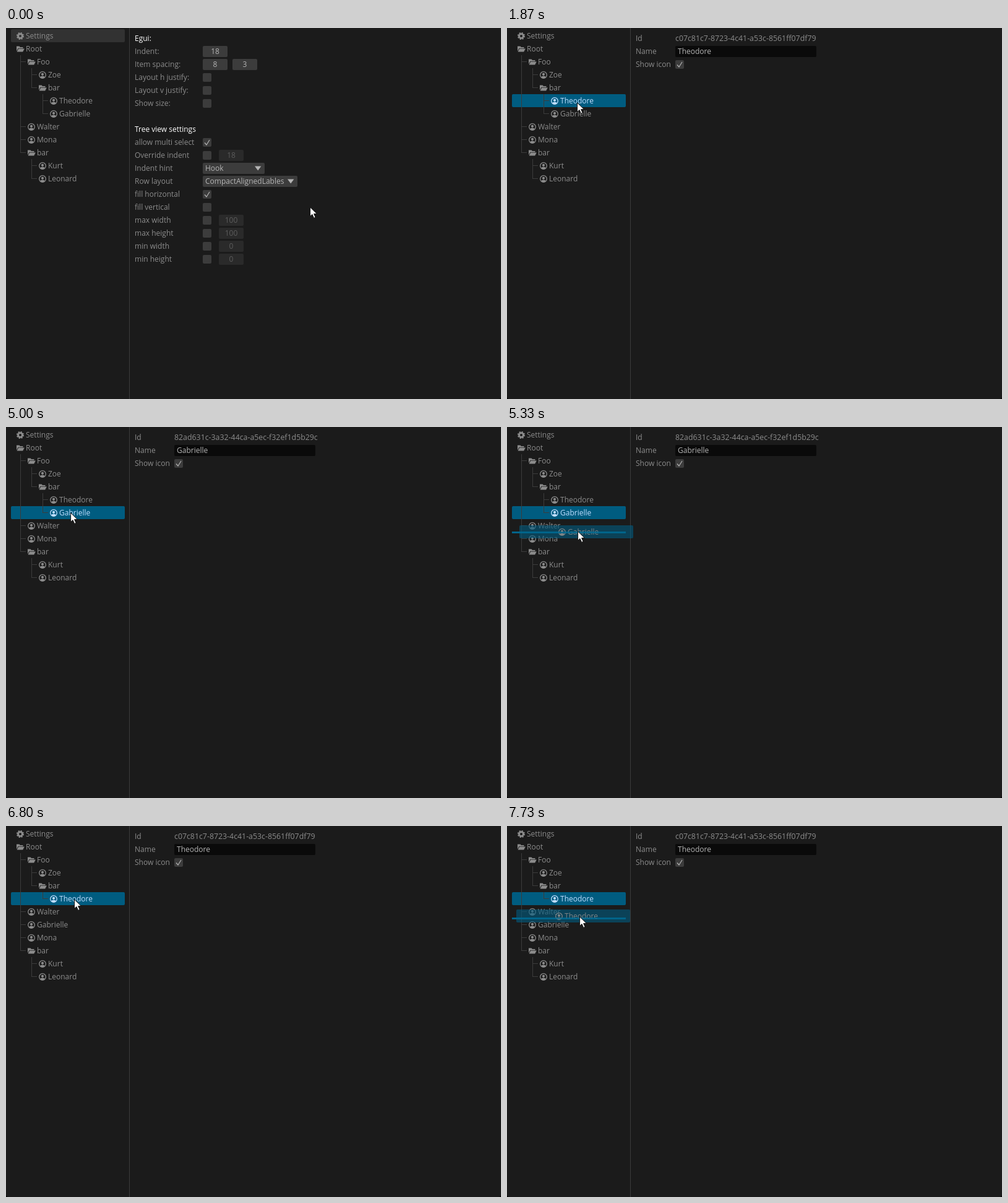
An HTML page that plays this animation: 800x600 px, repeating every 8000 ms.

```html
<!DOCTYPE html>
<html lang="en">
<head>
<meta charset="utf-8">
<title>Tree view</title>
<style>
html, body { margin: 0; width: 100%; height: 100%; overflow: hidden; background: #000; }
svg { display: block; width: 100vw; height: 100vh; }
text { font: 12px "Open Sans", "Noto Sans", sans-serif; white-space: pre; }
</style>
</head>
<body>
<svg id="stage" viewBox="0 0 800 600"></svg>
<script>
const LOOP = 8000, FPS = 15;
const GREY = '#8c8c8c', LIGHT = '#b4b4b4', WIDGET = '#3c3c3c', FADED = '#2a2a2a', DIM = '#5c5c5c';
const SELECT = '#005c80', SELECT_TEXT = '#c0deff';
const stage = document.getElementById('stage');

const people = {
  Theodore: 'c07c81c7-8723-4c41-a53c-8561ff07df79',
  Gabrielle: '82ad631c-3a32-44ca-a5ec-f32ef1d5b29c'
};
const moved = [2, 'Gabrielle', 'person'];
const head = [
  [0, 'Settings', 'gear'], [0, 'Root', 'folder'], [1, 'Foo', 'folder'],
  [2, 'Zoe', 'person'], [2, 'bar', 'folder'], [3, 'Theodore', 'person']
];
const tail = [
  [1, 'Mona', 'person'], [1, 'bar', 'folder'], [2, 'Kurt', 'person'], [2, 'Leonard', 'person']
];
const walter = [1, 'Walter', 'person'];
const before = [...head, [3, 'Gabrielle', 'person'], walter, ...tail];
const after = [...head, walter, [1, 'Gabrielle', 'person'], ...tail];

// Pointer path: [tick, x, y]
const path = [
  [7, 491, 289], [9, 428, 263], [12, 158, 153], [14, 109, 132], [15, 109, 132], [17, 113, 120],
  [35, 113, 120], [37, 118, 129], [39, 126, 140], [42, 117, 137],
  [64, 117, 137], [67, 102, 137],
  [74, 102, 137], [75, 104, 138], [76, 106, 144], [79, 115, 163], [81, 112, 172],
  [87, 112, 172], [88, 112, 172], [91, 114, 146], [94, 112, 119],
  [98, 112, 119], [102, 110, 118],
  [108, 110, 118], [109, 110, 121], [110, 111, 126], [113, 115, 138], [116, 117, 146]
];
const drags = [
  { from: 76, to: 88, x: 102, y: 137, name: 'Gabrielle' },
  { from: 110, to: 120, x: 110, y: 118, name: 'Theodore' }
];

const rect = (x, y, w, h, fill, r = 2) =>
  `<rect x="${x}" y="${y}" width="${w}" height="${h}" rx="${r}" fill="${fill}"/>`;
const text = (x, mid, s, fill = GREY, extra = '') =>
  `<text x="${x}" y="${mid + 4}" fill="${fill}" ${extra}>${s}</text>`;
const stroke = (d, color, w = 1) =>
  `<path d="${d}" fill="none" stroke="${color}" stroke-width="${w}"/>`;
const rowTop = i => 2 + 21 * i;

const icons = {
  gear: c => `<circle r="3.4" fill="none" stroke="${c}" stroke-width="2.8"/>
    <circle r="5.1" fill="none" stroke="${c}" stroke-width="2" stroke-dasharray="2.2 1.805"/>`,
  folder: c => `<path d="M-6 3.5V-4.5H-1.5L0 -3H4.5V-1.3H-3.4Z" fill="${c}"/>
    <path d="M-5.4 4.6L-2.9 -.5H6.8L4.2 4.6Z" fill="${c}"/>`,
  person: c => `<circle r="5.3" fill="none" stroke="${c}" stroke-width="1.3"/>
    <circle cy="-1.2" r="2.1" fill="${c}"/>
    <path d="M-4 3.4Q-2.6 1.6 0 1.6T4 3.4Q2.4 5.3 0 5.3T-4 3.4Z" fill="${c}"/>`
};

function label([depth, name, kind], top, color) {
  const x = 23 + 18 * depth, mid = top + 11;
  return `<g transform="translate(${x} ${mid})">${icons[kind](color)}</g>` + text(x + 9, mid, name, color);
}

function hooks(rows) {
  let d = '';
  rows.forEach(([depth, , kind], i) => {
    if (kind !== 'folder') return;
    const x = 23.5 + 18 * depth;
    let last = 0;
    for (let j = i + 1; j < rows.length && rows[j][0] > depth; j++) {
      if (rows[j][0] !== depth + 1) continue;
      last = rowTop(j) + 10.5;
      d += `M${x} ${last}h8.5`;
    }
    d += `M${x} ${rowTop(i + 1)}V${last + .5}`;
  });
  return stroke(d, WIDGET);
}

function tree(rows, selected) {
  const at = rows.findIndex(r => r[1] === selected);
  const active = selected !== 'Settings';
  return rect(8, rowTop(at), 184, 21, active ? SELECT : '#323232') + hooks(rows) +
    rows.map((r, i) => label(r, rowTop(i), i === at && active ? SELECT_TEXT : GREY)).join('');
}

const check = (x, mid, on) => rect(x, mid - 7, 14, 14, WIDGET) +
  (on ? stroke(`M${x + 3} ${mid + .5}l3 3.5L${x + 11} ${mid - 4}`, LIGHT, 1.2) : '');
const value = (x, mid, s, off) => rect(x, mid - 9, 40, 18, off ? FADED : WIDGET) +
  text(x + 20, mid, s, off ? DIM : LIGHT, 'text-anchor="middle"');
const combo = (mid, w, s) => rect(318, mid - 9, w, 18, WIDGET) + text(322, mid, s, LIGHT) +
  `<path d="M${302 + w} ${mid - 3.5}h10.4l-5.2 7Z" fill="${LIGHT}"/>`;
const option = (on, s) => mid => check(318, mid, on) + (s ? value(344, mid, s, true) : '');

const settings = [
  ['Egui:'],
  ['Indent:', y => value(318, y, 18)],
  ['Item spacing:', y => value(318, y, 8) + value(366, y, 3)],
  ['Layout h justify:', option()],
  ['Layout v justify:', option()],
  ['Show size:', option()],
  [''],
  ['Tree view settings'],
  ['allow multi select', option(true)],
  ['Override indent', option(false, '18')],
  ['Indent hint', y => combo(y, 100, 'Hook')],
  ['Row layout', y => combo(y, 153, 'CompactAlignedLables')],
  ['fill horizontal', option(true)],
  ['fill vertical', option()],
  ['max width', option(false, '100')],
  ['max height', option(false, '100')],
  ['min width', option(false, '0')],
  ['min height', option(false, '0')]
];
const settingsPage = settings.map(([name, widget], i) => {
  const mid = 17 + 21 * i;
  return text(208, mid, name, widget ? GREY : '#fff') + (widget ? widget(mid) : '');
}).join('');

const personPage = name =>
  text(208, 17, 'Id') + text(272, 17, people[name], GREY, 'style="font-size:12.35px"') +
  text(208, 38, 'Name') + rect(272, 29, 228, 18, '#0a0a0a') + text(276, 38, name, LIGHT) +
  text(208, 59, 'Show icon') + check(272, 59, true);

function pointerAt(tick) {
  const next = path.findIndex(p => p[0] > tick);
  if (next === 0) return path[0].slice(1);
  if (next < 0) return path[path.length - 1].slice(1);
  const a = path[next - 1], b = path[next], u = (tick - a[0]) / (b[0] - a[0]);
  return [1, 2].map(i => Math.round(a[i] + (b[i] - a[i]) * u));
}

function ghost(rows, drag, [x, y]) {
  const i = rows.findIndex(r => r[1] === drag.name);
  const top = rowTop(i), edge = rowTop(Math.round((y + 1 - rowTop(0)) / 21));
  return rect(8, edge - 1, 184, 3, SELECT, 0) +
    `<g transform="translate(${x - drag.x} ${y - drag.y})">` +
    `<g opacity=".6">${rect(8, top, 184, 21, SELECT)}</g>` +
    `<g opacity=".9">${label(rows[i], top, GREY)}</g></g>` +
    `<g opacity=".7">${rect(8, edge - 1, 184, 3, '#00688f', 0)}</g>`;
}

const arrow = ([x, y]) => `<path transform="translate(${x} ${y})" fill="#fff" stroke="#111"
  d="M.6 .9V15.6L4 12.5L6.7 18.4L9.2 17.3L6.6 11.6H11.4Z"/>`;

function draw(tick) {
  const selected = tick < 28 ? 'Settings' : tick >= 50 && tick < 98 ? 'Gabrielle' : 'Theodore';
  const rows = tick < 88 ? before : after;
  const pos = pointerAt(tick);
  const drag = drags.find(d => tick >= d.from && tick < d.to);
  stage.innerHTML =
    '<path d="M0 0H800V596Q800 600 796 600H4Q0 600 0 596Z" fill="#1b1b1b"/>' +
    rect(199, 0, 1, 600, WIDGET, 0) +
    tree(rows, selected) +
    (selected === 'Settings' ? settingsPage : personPage(selected)) +
    (drag ? ghost(rows, drag, pos) : '') +
    arrow(pos);
}

let shown = -1;
const start = performance.now();
function frame() {
  const t = (performance.now() - start) % LOOP;
  const tick = Math.min(LOOP / 1000 * FPS - 1, Math.floor((t + 4) * FPS / 1000));
  if (tick !== shown) draw(shown = tick);
  requestAnimationFrame(frame);
}
frame();
</script>
</body>
</html>
```
